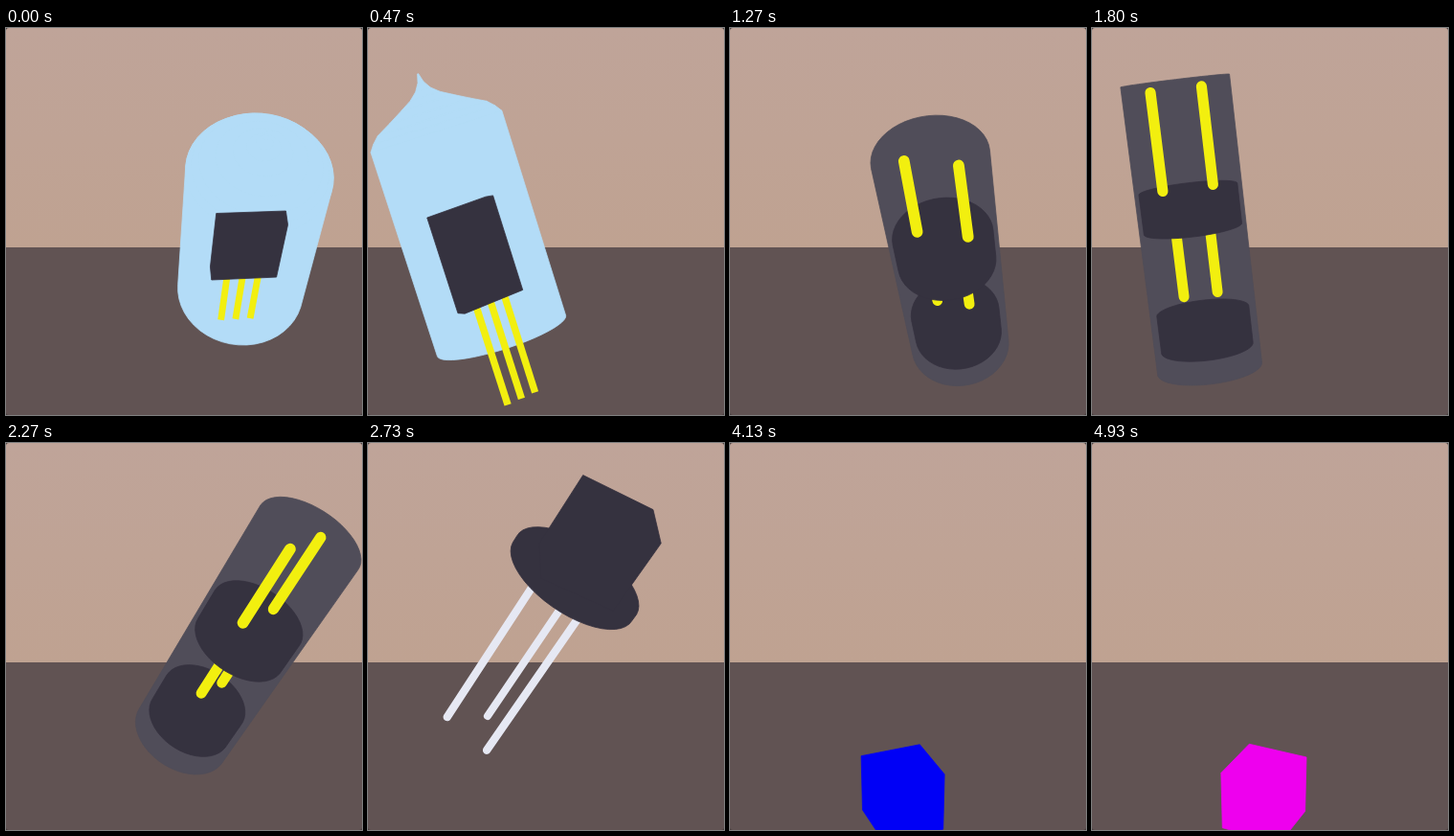
Animation of 372x404 px, one loop 4990 ms. Source, as an HTML page:

```html
<!DOCTYPE html>
<html lang="en">
<head>
<meta charset="utf-8">
<title>Tumbling components</title>
<style>
html, body { margin: 0; width: 100%; height: 100%; overflow: hidden; background: #463c3c; }
svg { display: block; width: 100vw; height: 100vh; }
</style>
</head>
<body>
<svg viewBox="0 0 372 404" preserveAspectRatio="none">
  <defs>
    <linearGradient id="wall" x1="0" y1="0" x2="0" y2="1">
      <stop offset="0" stop-color="#bfa499"/>
      <stop offset="1" stop-color="#bfa291"/>
    </linearGradient>
    <clipPath id="frame"><rect width="372" height="404" rx="3"/></clipPath>
  </defs>
  <g clip-path="url(#frame)">
    <rect width="372" height="230" fill="url(#wall)"/>
    <rect y="229" width="372" height="175" fill="#615353"/>
    <g id="scene" stroke-linejoin="round"></g>
  </g>
</svg>
<script>
const LOOP = 4990, STEP = 1000 / 15, FOCAL = 1100, CENTER_X = 180;
const GLASS = '#b3dcf7', DARK = '#35323f', SHELL = '#504d59', YELLOW = '#f2ef0f', METAL = '#e6e8f3';
const CUBE_COLORS = ['#f40000', '#00f400', '#0000f6', '#f0f000', '#00f0f0', '#ee00ee'];
const scene = document.getElementById('scene');
const rad = deg => deg * Math.PI / 180;
const turn = (a, b, deg) => {
  const c = Math.cos(rad(deg)), s = Math.sin(rad(deg));
  return [a * c + b * s, b * c - a * s];
};

// Twist about its own axis, lean, orbit, then the camera looks down by 32 degrees.
function projector({ orbit, lean, twist, baseY, radius, phase }) {
  const at = rad(orbit + phase);
  const cx = CENTER_X + radius * Math.sin(at);
  const cy = baseY + radius * 0.53 * Math.cos(at);
  return ([x, y, z]) => {
    [x, z] = turn(x, z, twist);
    [z, y] = turn(z, y, lean);
    [x, z] = turn(x, z, orbit);
    [z, y] = turn(z, y, 32);
    const k = FOCAL / (FOCAL - z);
    return [cx + x * k, cy - y * k, k];
  };
}

function hull(points) {
  const sorted = [...points].sort((a, b) => a[0] - b[0] || a[1] - b[1]);
  const chain = list => {
    const out = [];
    for (const p of list) {
      while (out.length > 1) {
        const [a, b] = out.slice(-2);
        if ((b[0] - a[0]) * (p[1] - a[1]) - (b[1] - a[1]) * (p[0] - a[0]) > 0) break;
        out.pop();
      }
      out.push(p);
    }
    return out.slice(0, -1);
  };
  return [...chain(sorted), ...chain(sorted.reverse())];
}

const outline = points =>
  'M' + hull(points).map(p => p[0].toFixed(2) + ' ' + p[1].toFixed(2)).join('L') + 'Z';
const shape = (d, color) => `<path d="${d}" fill="${color}" stroke="${color}" stroke-width=".8"/>`;

const ring = (r, y) => Array.from({ length: 48 }, (_, i) =>
  [r * Math.cos(i * Math.PI / 24), y, r * Math.sin(i * Math.PI / 24)]);

// profile: [radius, height] pairs along the axis
function lathe(view, profile, color) {
  const rings = profile.map(([r, y]) => ring(r, y).map(view));
  return shape(rings.slice(1).map((next, i) => outline([...rings[i], ...next])).join(''), color);
}

const disc = (view, r, y, thick, color) =>
  lathe(view, [[r, y - thick / 2], [r, y + thick / 2]], color);

function box(view, w, h, d, y, color) {
  const corners = [];
  for (const i of [-0.5, 0.5]) for (const j of [-0.5, 0.5]) for (const k of [-0.5, 0.5])
    corners.push(view([i * w, y + j * h, k * d]));
  return shape(outline(corners), color);
}

function pin(view, x, z, from, to, width, color, cap) {
  const a = view([x, from, z]), b = view([x, to, z]);
  return `<line x1="${a[0]}" y1="${a[1]}" x2="${b[0]}" y2="${b[1]}" stroke="${color}"
    stroke-width="${width * (a[2] + b[2]) / 2}" stroke-linecap="${cap}"/>`;
}

function tube(view) {
  const glass = [[71, -112], [71, 112], [66, 119], [59, 126], [44, 134], [28, 143],
    [16, 150], [8, 157], [3, 165], [0.5, 174]];
  return lathe(view, glass, GLASS) +
    [-17.5, 0, 17.5].map(x => pin(view, x, 0, -70, -184, 7.5, YELLOW, 'butt')).join('') +
    box(view, 72, 105, 17, -22, DARK);
}

function canister(view) {
  const pins = (gap, from, to) =>
    [-gap, gap].map(x => pin(view, x, 0, from, to, 11, YELLOW, 'round')).join('');
  return disc(view, 56, 0, 306, SHELL) + disc(view, 49, -110, 40, DARK) + pins(18, 0, -72) +
    disc(view, 51.5, 20, 42, DARK) + pins(26.5, 42, 144);
}

function transistor(view) {
  const legs = [0, 120, 240].map(a =>
    pin(view, 34 * Math.cos(rad(a)), 34 * Math.sin(rad(a)), 0, -233, 8.6, METAL, 'round'));
  return legs.join('') + disc(view, 74.5, 0, 9, DARK) + box(view, 85, 92, 68, 46, DARK);
}

const cube = (view, n) =>
  box(view, 66, 67, 66, 0, CUBE_COLORS[Math.floor((n - 55.7) / 3.12) % 6]);

// Each act moves steadily through two poses: [step, orbit, lean, twist, baseY]
const ACTS = [
  { start: 0, draw: tube, radius: 76, phase: 66,
    from: [0, 12, 25.5, -5, 208], to: [7, -144, 31, -5, 207] },
  { start: 19, draw: canister, radius: 79, phase: 54,
    from: [19, -18, 19.2, 5, 209], to: [34, -289.5, 27.5, -20, 233] },
  { start: 38, draw: transistor, radius: 75, phase: 59,
    from: [38, 156, 30, 92, 174], to: [49, -81, 30, 92, 174] },
  { start: 56, draw: cube, radius: 0, phase: 0,
    from: [62, 21.5, 0, 0, 365], to: [74, -205, 0, 0, 365] }
];

function render(time) {
  const n = Math.floor((time % LOOP + 4) / STEP);
  const act = ACTS.filter(a => n >= a.start).pop();
  const { from, to, radius, phase } = act;
  const f = (n - from[0]) / (to[0] - from[0]);
  const [, orbit, lean, twist, baseY] = from.map((v, i) => v + (to[i] - v) * f);
  scene.innerHTML = act.draw(projector({ orbit, lean, twist, baseY, radius, phase }), n);
}

const begin = performance.now();
function tick() {
  render(performance.now() - begin);
  requestAnimationFrame(tick);
}
tick();
</script>
</body>
</html>
```
